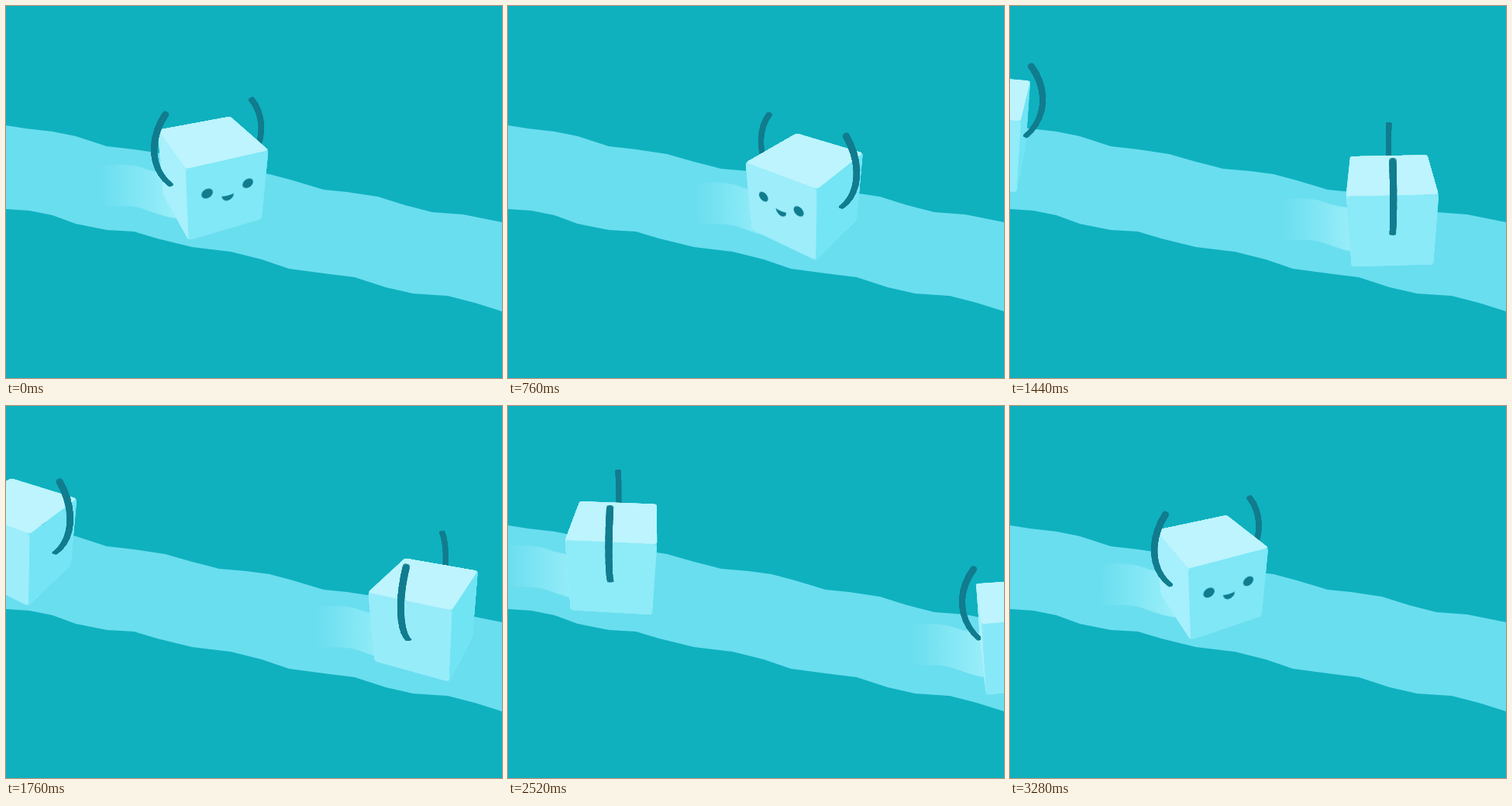
An HTML page without scripts for the animation above (3320 ms loop, 640 by 480 pixels).

```html
<!DOCTYPE html>
<html lang="en">
<head>
<meta charset="utf-8">
<title>Sliding ice cube</title>
<style>
@property --yaw { syntax: '<angle>'; inherits: true; initial-value: 0deg; }

html, body { margin: 0; width: 100%; height: 100%; overflow: hidden; background: #0fb1bf; }
.stage { position: relative; width: 640px; height: 480px; overflow: hidden; }
.band { position: absolute; left: 0; top: 0; fill: #69deef; }

/* each cube crosses the stage in two loops; the second runs one loop behind */
.cube {
  position: absolute; left: 0; top: 0; width: 0; height: 0;
  perspective: 500px;
  animation: slide 6640ms linear infinite;
}
.lead { animation-delay: -3320ms; }
@keyframes slide {
  from { transform: translate(-261px, 116.6px); --yaw: 279.5deg; }
  to { transform: translate(788px, 318.4px); --yaw: -232.5deg; }
}

.trail {
  position: absolute; left: -150px; top: -20px; width: 130px; height: 85px;
  background: linear-gradient(90deg, #9aeef900 5%, #9aeef9 80%);
  clip-path: path("M0 8C30 6 50 6 65 12S95 18 130 24V78C100 78 85 72 65 65S30 62 0 60Z");
}

.body, .arm { position: absolute; width: 0; height: 0; transform-style: preserve-3d; }
.body { transform: rotateX(-33deg) rotateY(var(--yaw)); }
.left { transform: rotateY(180deg); }

.side, .cap {
  position: absolute; left: -51.25px; top: -51.25px;
  width: 102.5px; height: 102.5px; border-radius: 5px;
}
/* sides facing left are lighter */
.side {
  --lit: sin(calc(var(--yaw) + var(--turn)));
  background: rgb(calc(140 - 29 * var(--lit)) calc(234 - 6 * var(--lit)) calc(248 - 4 * var(--lit)));
  transform: rotateY(var(--turn)) translateZ(51.25px);
}
.cap { background: #bdf4fd; transform: rotateX(90deg) translateZ(51.25px); }
.base { background: #8ce9f7; transform: rotateX(-90deg) translateZ(51.25px); }
.side svg { display: block; width: 100%; height: 100%; fill: #107c8e; }

/* arm: short capsules along an arc, each turned back to the viewer */
.arm i {
  position: absolute; left: -4px; top: -8.5px; width: 8px; height: 17px;
  border-radius: 4px; background: #107c8e;
  transform: translate(-4px, -47px) rotateZ(calc(35.4deg - var(--n) * 7.86deg))
    translateX(75px) rotateY(calc(-1 * var(--yaw)));
}
.arm i:nth-child(1) { --n: 0; }
.arm i:nth-child(2) { --n: 1; }
.arm i:nth-child(3) { --n: 2; }
.arm i:nth-child(4) { --n: 3; }
.arm i:nth-child(5) { --n: 4; }
.arm i:nth-child(6) { --n: 5; }
.arm i:nth-child(7) { --n: 6; }
.arm i:nth-child(8) { --n: 7; }
.arm i:nth-child(9) { --n: 8; }
.arm i:nth-child(10) { --n: 9; }
</style>
</head>
<body>
<div class="stage">
  <svg class="band" width="640" height="480" viewBox="0 0 640 480">
    <path d="M0 154L25 158 60 162 90 168 130 181 165 185 205 191 240 201 275 210 310 213 340 217 370 225 410 237 440 240 480 246 515 257 550 266 590 269 640 279
      V394L605 383 570 374 525 371 490 363 450 350 410 345 365 339 330 327 290 317 240 311 195 300 165 291 130 289 90 281 60 270 30 264 0 262Z"/>
  </svg>

  <div class="cube lead">
    <div class="trail"></div>
    <div class="body">
      <div class="cap base"></div>
      <div class="side" style="--turn:0deg">
        <svg viewBox="-51.25 -51.25 102.5 102.5">
          <ellipse cx="-26.4" cy="-11.5" rx="7.2" ry="6.8"/>
          <ellipse cx="26.4" cy="-11.5" rx="7.2" ry="6.8"/>
          <path d="M-8 -2Q0 0 8 -2Q8 6 0 6.500Q-6 6 -8 -2Z"/>
        </svg>
      </div>
      <div class="side" style="--turn:90deg"></div>
      <div class="side" style="--turn:180deg"></div>
      <div class="side" style="--turn:270deg"></div>
      <div class="cap"></div>
      <div class="arm"><i></i><i></i><i></i><i></i><i></i><i></i><i></i><i></i><i></i><i></i></div>
      <div class="arm left"><i></i><i></i><i></i><i></i><i></i><i></i><i></i><i></i><i></i><i></i></div>
    </div>
  </div>

  <div class="cube">
    <div class="trail"></div>
    <div class="body">
      <div class="cap base"></div>
      <div class="side" style="--turn:0deg">
        <svg viewBox="-51.25 -51.25 102.5 102.5">
          <ellipse cx="-26.4" cy="-11.5" rx="7.2" ry="6.8"/>
          <ellipse cx="26.4" cy="-11.5" rx="7.2" ry="6.8"/>
          <path d="M-8 -2Q0 0 8 -2Q8 6 0 6.500Q-6 6 -8 -2Z"/>
        </svg>
      </div>
      <div class="side" style="--turn:90deg"></div>
      <div class="side" style="--turn:180deg"></div>
      <div class="side" style="--turn:270deg"></div>
      <div class="cap"></div>
      <div class="arm"><i></i><i></i><i></i><i></i><i></i><i></i><i></i><i></i><i></i><i></i></div>
      <div class="arm left"><i></i><i></i><i></i><i></i><i></i><i></i><i></i><i></i><i></i><i></i></div>
    </div>
  </div>
</div>
</body>
</html>
```
